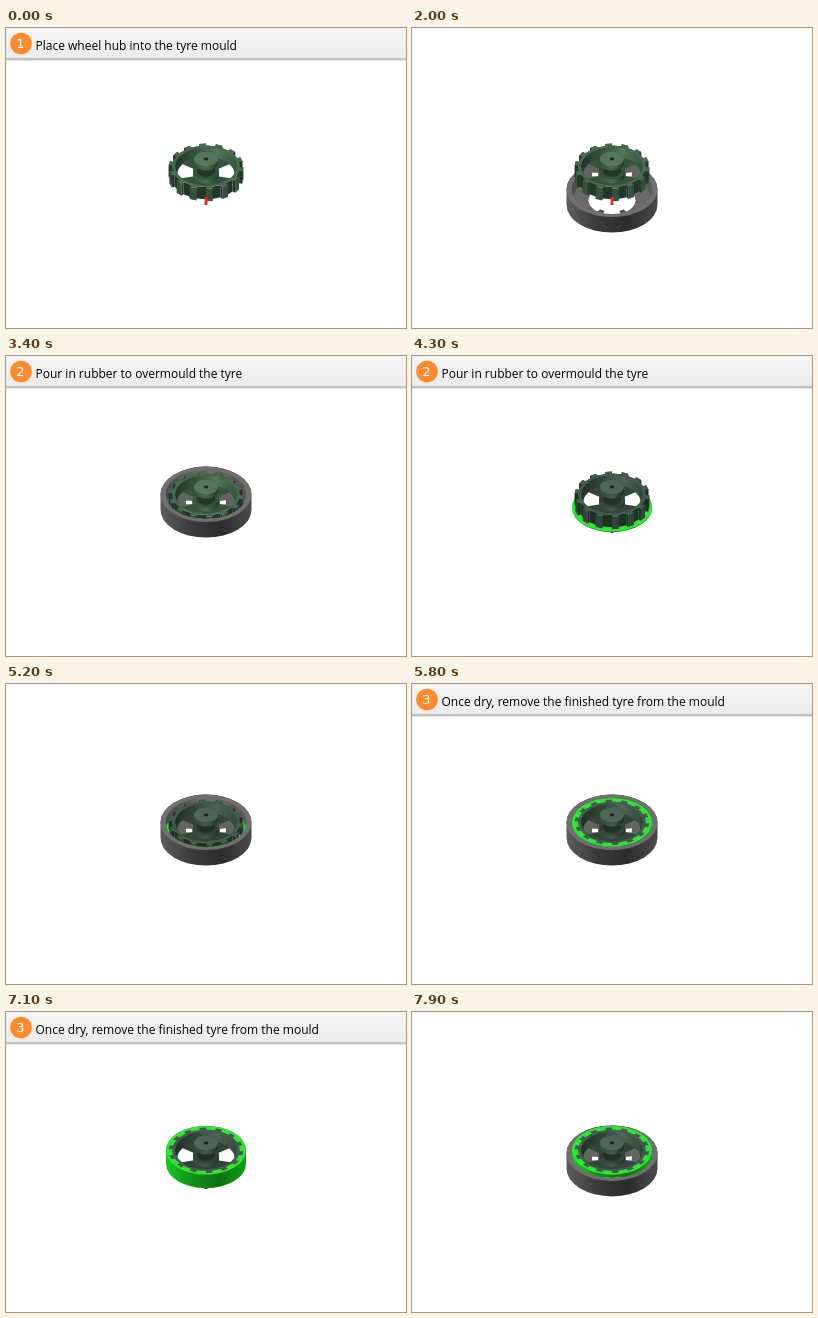
Animation of 400x300 px, one loop 8 s. Source, as an HTML page with a canvas:

```html
<!DOCTYPE html>
<html lang="en">
<head>
<meta charset="utf-8">
<title>Moulding a tyre</title>
<style>
html, body { margin: 0; width: 100%; height: 100%; overflow: hidden; background: #fff; }
canvas { display: block; }
</style>
</head>
<body>
<canvas id="stage" width="400" height="300"></canvas>
<script>
const ctx = document.getElementById('stage').getContext('2d');
const CX = 200, CY = 138.3, TILT = 0.61, TAU = Math.PI * 2;
const TEETH = 14, HUB_H = 12.3, TYRE_R = 40, TYRE_H = 13.5;
const MOULD_R = 45.5, MOULD_H = 15.5, BORE_R = 40.5, LIFT = 23;
const CAPTIONS = [
  'Place wheel hub into the tyre mould',
  'Pour in rubber to overmould the tyre',
  'Once dry, remove the finished tyre from the mould'
];

// z grows downwards on screen
const point = (r, a, z) => [CX + r * Math.cos(a), CY + r * TILT * Math.sin(a) + z];

function fill(color) {
  ctx.fillStyle = color;
  ctx.fill();
}

function polygon(points, color) {
  ctx.beginPath();
  points.forEach(p => ctx.lineTo(...p));
  ctx.closePath();
  fill(color);
}

function ring(r, z, from = 0, to = TAU, back = false) {
  ctx.ellipse(CX, CY + z, r, r * TILT, 0, from, to, back);
}

function disc(r, z, color) {
  ctx.beginPath();
  ring(r, z);
  fill(color);
}

function shade(r, ...colors) {
  const g = ctx.createLinearGradient(CX - r, 0, CX + r, 0);
  colors.forEach((c, i) => g.addColorStop(i / (colors.length - 1), c));
  return g;
}

function cylinder(r, top, bottom, face, side) {
  ctx.beginPath();
  ring(r, bottom, 0, Math.PI);
  ring(r, top, Math.PI, TAU);
  ctx.closePath();
  fill(side);
  disc(r, top, face);
}

function sector(r0, r1, a0, a1, z, color) {
  ctx.beginPath();
  ring(r1, z, a0, a1);
  ring(r0, z, a1, a0, true);
  ctx.closePath();
  fill(color);
}

function drawMould(z) {
  cylinder(MOULD_R, z, z + MOULD_H, '#6f706f', shade(MOULD_R, '#5c5d5c', '#3a3b3a', '#2b2c2b', '#4a4b4a'));
  ctx.save();
  ctx.beginPath();
  ring(BORE_R, z);
  ctx.clip();
  disc(BORE_R, z, shade(BORE_R, '#4a4b4a', '#6c6d6c', '#555655'));
  disc(39, z + 10, '#696a69');
  disc(23.5, z + 11, '#fff');
  for (const a of [1.05, 2.1]) {
    sector(19, 24, a - .13, a + .13, z + 11, '#4b4c4b');
  }
  ctx.restore();
}

function drawTyre(z) {
  cylinder(TYRE_R, z, TYRE_H, '#32e238', shade(TYRE_R, '#18c822', '#129018', '#0c7012', '#10a018'));
}

const outline = [];
for (let i = 0; i < TEETH; i++) {
  const a = (i + .1) / TEETH * TAU, b = a + .4 / TEETH * TAU;
  outline.push([34, a], [37.3, a], [37.3, b], [34, b]);
}

function drawWalls(height, side, dark) {
  const walls = outline.map((p, i) => [p, outline[(i + 1) % outline.length], i % 4]);
  const depth = ([p, q]) => Math.sin(p[1]) + Math.sin(q[1]);
  walls.sort((a, b) => depth(a) - depth(b));
  for (const [p, q, kind] of walls) {
    polygon([point(...p, 0), point(...q, 0), point(...q, height), point(...p, height)],
      kind === 1 ? side : dark);
  }
}

function drawHub(height, inMould, { face, side, dark, light }) {
  drawWalls(height, side, dark);
  polygon(outline.map(p => point(...p, 0)), face);

  ctx.save();
  ctx.beginPath();
  ring(31, 0);
  ctx.clip();
  disc(31, 0, shade(31, dark, side, light, side));
  disc(29.5, 8, side);
  for (const a of [2.88, -.61]) {
    sector(12, 28.5, a, a + .87, 8, inMould ? '#626562' : '#fff');
  }
  if (inMould) {
    sector(14, 20, 2.95, 3.3, 8, '#fff');
    sector(14, 20, -.16, .19, 8, '#fff');
  }
  ctx.restore();

  cylinder(13, 5, 9, side, shade(13, side, face, dark));
  cylinder(9, -3, 5, dark, dark);
  cylinder(12, -7.3, -3, light, shade(12, side, face, dark));
  disc(2.3, -7.3, '#1c2a20');
}

const GREEN = { face: '#476a4d', side: '#35523b', dark: '#22372a', light: '#54765b' };
const GREY = { face: '#445a4c', side: '#33453a', dark: '#222f27', light: '#4f6657' };

function drawScene({ mould = null, level = null, pin }) {
  const drawPin = () => {
    ctx.fillStyle = pin;
    ctx.fillRect(198.5, 169, 3, 8);
  };
  ctx.save();
  if (mould !== null) {
    drawMould(mould);
    // the front wall of the mould hides whatever sits below its rim
    ctx.beginPath();
    ctx.moveTo(CX - BORE_R, 0);
    ctx.lineTo(CX + BORE_R, 0);
    ring(BORE_R, mould, 0, Math.PI);
    ctx.clip();
  }
  if (level === null) {
    drawHub(HUB_H, mould !== null, GREEN);
    drawPin();
  } else {
    drawPin();
    drawTyre(level);
    drawHub(Math.min(HUB_H, level), mould !== null, GREY);
  }
  ctx.restore();
}

function drawBanner(n) {
  const g = ctx.createLinearGradient(0, 0, 0, 30);
  g.addColorStop(0, '#f3f3f3');
  g.addColorStop(1, '#ececec');
  ctx.fillStyle = g;
  ctx.fillRect(0, 0, 400, 30);
  ctx.fillStyle = '#c3c3c3';
  ctx.fillRect(0, 30, 400, 2.5);
  ctx.beginPath();
  ctx.arc(15, 15.5, 10.8, 0, TAU);
  fill('#ff8b2e');
  ctx.fillStyle = '#fff';
  ctx.textAlign = 'center';
  ctx.font = '13px "DejaVu Sans", sans-serif';
  ctx.fillText(n + 1, 14.5, 20);
  ctx.fillStyle = '#000';
  ctx.textAlign = 'left';
  ctx.font = '12px "Open Sans", sans-serif';
  ctx.fillText(CAPTIONS[n], 29.5, 21.5);
}

// each stage: 20 steps with a caption (scene changes halfway), then 9 steps of motion
function sceneAt(stage, step) {
  const part = step < 10 ? 0 : step < 20 ? 1 : 2;
  const k = (step - 20) / 8;
  const red = '#d8323c', grey = '#39443d';
  return [
    [{ pin: red }, { pin: red }, { mould: LIFT * (1 - k), pin: red }],
    [{ mould: 0, pin: red }, { level: 12.8, pin: grey }, { mould: 0, level: 12.8 * (1 - k), pin: grey }],
    [{ mould: 0, level: 0, pin: grey }, { level: 0, pin: grey }, { mould: LIFT * k, level: 0, pin: grey }]
  ][stage][part];
}

function frame(now) {
  const tick = Math.floor(now % 8000 / 100);
  const stage = Math.floor(tick / 29), step = tick % 29;
  ctx.fillStyle = '#fff';
  ctx.fillRect(0, 0, 400, 300);
  drawScene(sceneAt(stage, step));
  if (step < 20) drawBanner(stage);
  requestAnimationFrame(frame);
}
requestAnimationFrame(frame);
</script>
</body>
</html>
```
